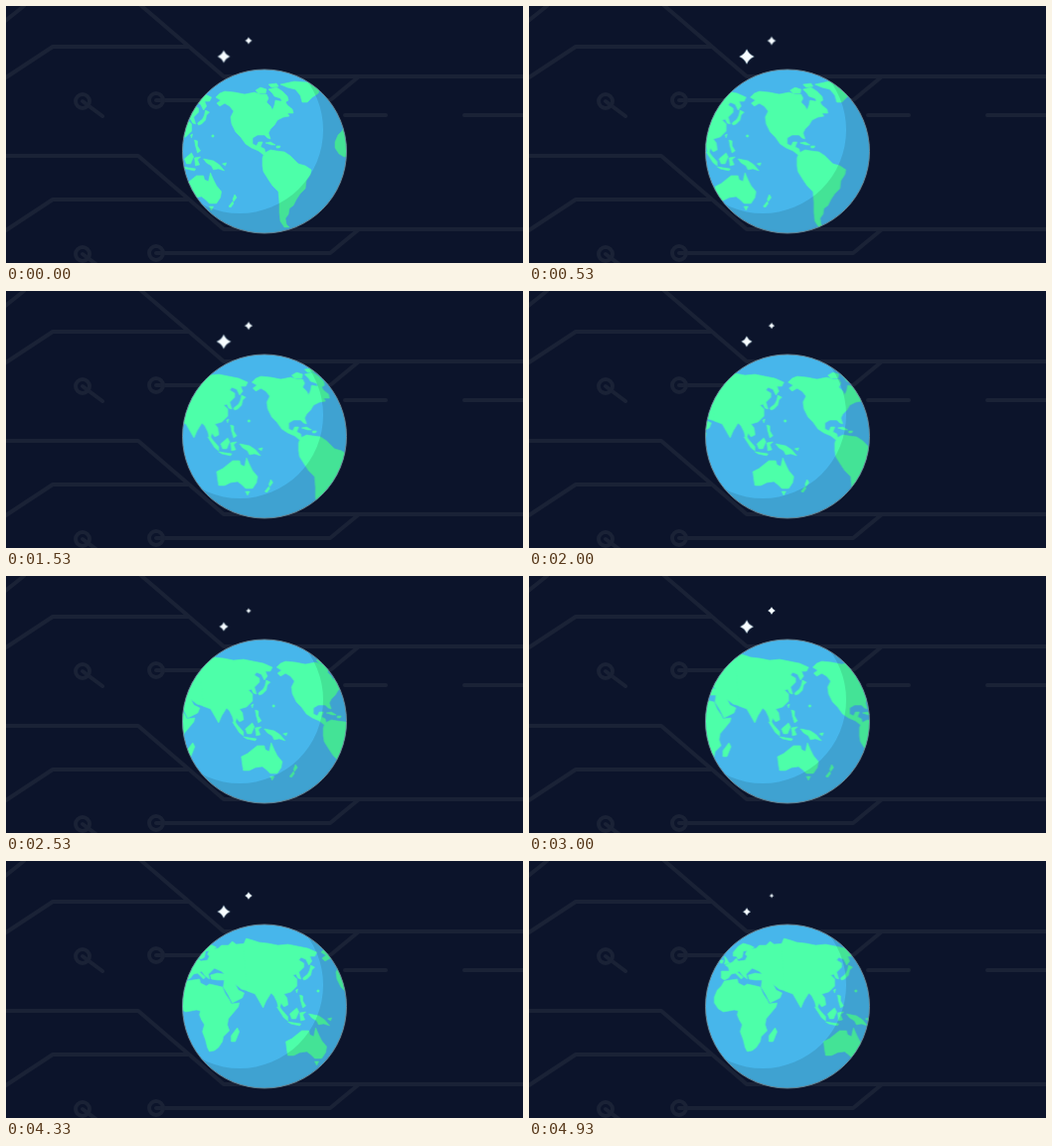
These frames come from a looping animation (520 by 259 pixels, 5 s). An HTML page:

```html
<!DOCTYPE html>
<html lang="en">
<head>
<meta charset="utf-8">
<title>Turning globe</title>
<style>
  html, body { margin: 0; width: 100%; height: 100%; overflow: hidden; background: #0c142b; }
  svg { display: block; width: 100vw; height: 100vh; }

  .circuit { fill: none; stroke: #1a2236; stroke-width: 4; stroke-linejoin: round; stroke-linecap: round; }
  .circuit circle { fill: #1a2236; stroke: none; }
  .sea { fill: #47b6eb; }
  .land { fill: #4dffa9; stroke: #4dffa9; stroke-width: .6; stroke-linejoin: round; }
  .shade { fill: #000; fill-opacity: .11; fill-rule: evenodd; }
  .rim { fill: none; stroke: #65818f; stroke-width: 1; }

  .map { animation: turn 5s steps(75) infinite; }
  @keyframes turn { to { transform: translateX(124px); } }

  .star { fill: #f7fcff; stroke: #9cc9dc; stroke-width: .5; animation: twinkle 5s linear infinite; }
  @keyframes twinkle {
    0% { transform: scale(.6); }
    21.4% { transform: scale(.87); }
    40% { transform: scale(.53); }
    48% { transform: scale(.37); }
    60% { transform: scale(.65); }
    75% { transform: scale(.88); }
    86.6% { transform: scale(.63); }
    100% { transform: scale(.35); }
  }
</style>
</head>
<body>
<svg viewBox="0 0 520 259" preserveAspectRatio="none">
  <defs>
    <clipPath id="disc"><circle cx="260" cy="146.5" r="82.5"/></clipPath>
    <path id="spark" d="M0-10Q3-3 10 0Q3 3 0 10Q-3 3-10 0Q-3-3 0-10Z"/>

    <g id="tile">
      <path d="M-10 80L0 72L47 41H184M-10-3H133L219 71H530M151 95H326L355 71M77 96L97 111M341 110H382M461 110H530"/>
      <circle cx="77" cy="96" r="7"/>
      <circle cx="151" cy="95" r="7"/>
    </g>

    <g id="world">
      <!-- Americas -->
      <path d="M212 98L216 95L211 92L215 88L220 86L230 87L240 89L250 87L256 89L262 89L264 93L262 97L266 101L268 105L270 100L271 95L276 96L280 95L283 100L288 104L289 108L283 108L285 111L279 112L273 115L270 120L266 124L264 128L266 134L263 133L260 130L253 130L248 133L248 139L252 141L254 137L258 137L256 142L260 144L261 149L266 151L265 153L259 150L254 146L247 143L241 139L236 132L231 127L227 119L226 112L229 106L225 101L220 98L215 101Z"/>
      <path d="M251 85L256 82L262 84L261 88L254 88ZM264 84L272 82L278 86L283 91L284 95L279 98L276 93L270 91L268 88ZM264 79L272 78L274 81L267 82Z"/>
      <path d="M276 79L290 76L303 77L316 82L314 88L308 92L303 97L298 97L296 90L291 84L283 82Z"/>
      <path d="M258 153L260 148L266 145L272 146L280 147L286 151L290 155L294 159L301 161L307 165L306 170L302 176L301 184L296 189L292 195L289 201L285 204L284 210L281 214L282 220L285 223L280 223L276 217L275 208L275 198L274 187L268 181L264 175L259 167L258 161Z"/>
      <path d="M261 138L266 137L271 140L267 140ZM272 141L276 141L275 143L272 143Z"/>
      <!-- New Zealand and a Pacific island -->
      <path d="M230 190L232 193L229 197L228 195ZM228 197L229 199L226 203L224 202ZM207 130H209V132H207Z"/>

      <!-- Africa, Europe, Asia -->
      <g transform="translate(-122.3)">
        <path d="M198 121L204 120L211 119L212 123L218 126L221 124L230 126L234 127L237 134L241 140L243 144L251 143L250 147L245 153L240 159L239 165L241 171L235 177L234 182L230 188L226 191L221 192L219 188L217 180L214 172L216 165L213 160L211 155L212 151L208 150L203 151L197 152L192 149L188 143L188 137L191 130L195 126Z"/>
        <path d="M249 168L251 172L247 182L243 182L243 176Z"/>
        <path d="M195 118L195 111L203 111L202 107L199 105L206 102L210 98L212 101L219 100L221 96L219 94L221 90L217 91L216 97L212 99L210 96L207 96L207 92L212 86L217 83L224 85L228 87L225 89L230 88L233 85L240 85L244 81L248 84L260 83L260 131L253 129L247 124L250 130L256 133L254 138L244 143L240 135L235 127L236 120L229 120L223 119L222 115L229 113L236 114L233 111L226 108L223 111L220 114L221 119L217 116L213 111L211 112L217 117L215 119L209 113L205 114L202 118L198 120Z"/>
        <path d="M255 85L258 78L265 80L271 82L280 83L290 85L300 84L310 86L320 88L329 92L327 96L322 96L324 101L321 105L318 99L313 97L311 100L316 103L316 107L311 112L313 119L310 118L308 114L305 115L309 119L309 126L303 132L296 134L299 138L300 145L296 147L293 143L292 147L295 154L291 150L289 142L286 136L283 133L278 141L275 148L271 141L267 134L259 131Z"/>
        <path d="M198 96L200 98L203 103L198 104L199 100ZM194 100L197 100L196 103L194 103Z"/>
      </g>

      <!-- Pacific rim and Australia -->
      <g transform="translate(-74.4)">
        <path d="M275 105L279 107L276 110L275 115L271 119L268 120L267 118L272 114L274 110Z"/>
        <path d="M264 135L267 136L267 141L270 146L267 148L265 141ZM260 130L262 129L261 133Z"/>
        <path d="M241 147L245 149L252 157L252 161L248 158ZM252 162L258 163L265 164L264 166L255 164ZM254 154L261 148L263 152L260 159L256 159ZM264 153L270 152L267 155L269 160L265 161Z"/>
        <path d="M273 154L278 155L283 156L289 160L294 166L288 164L283 165L281 161L276 158ZM292 159L296 158L295 161Z"/>
        <path d="M250 182L256 179L261 175L266 171L273 171L274 175L278 177L280 168L283 175L286 181L291 187L290 193L286 199L279 199L275 195L271 192L264 193L258 196L252 196L251 190ZM279 202L283 202L281 206Z"/>
      </g>
    </g>
  </defs>

  <g class="circuit">
    <use href="#tile"/>
    <use href="#tile" y="154"/>
    <path d="M-2 16L18 0"/>
  </g>

  <g clip-path="url(#disc)">
    <circle class="sea" cx="260" cy="146.5" r="83"/>
    <g class="map land">
      <use href="#world"/>
      <use href="#world" x="265.3"/>
    </g>
    <path class="shade" d="M170 30H350V240H170ZM151 125a84 84 0 1 0 168 0a84 84 0 1 0-168 0Z"/>
  </g>
  <circle class="rim" cx="260" cy="146.5" r="82.5"/>

  <g transform="translate(219 51)"><use class="star" href="#spark"/></g>
  <g transform="translate(244 35) scale(.56)"><use class="star" href="#spark"/></g>
</svg>
</body>
</html>
```
